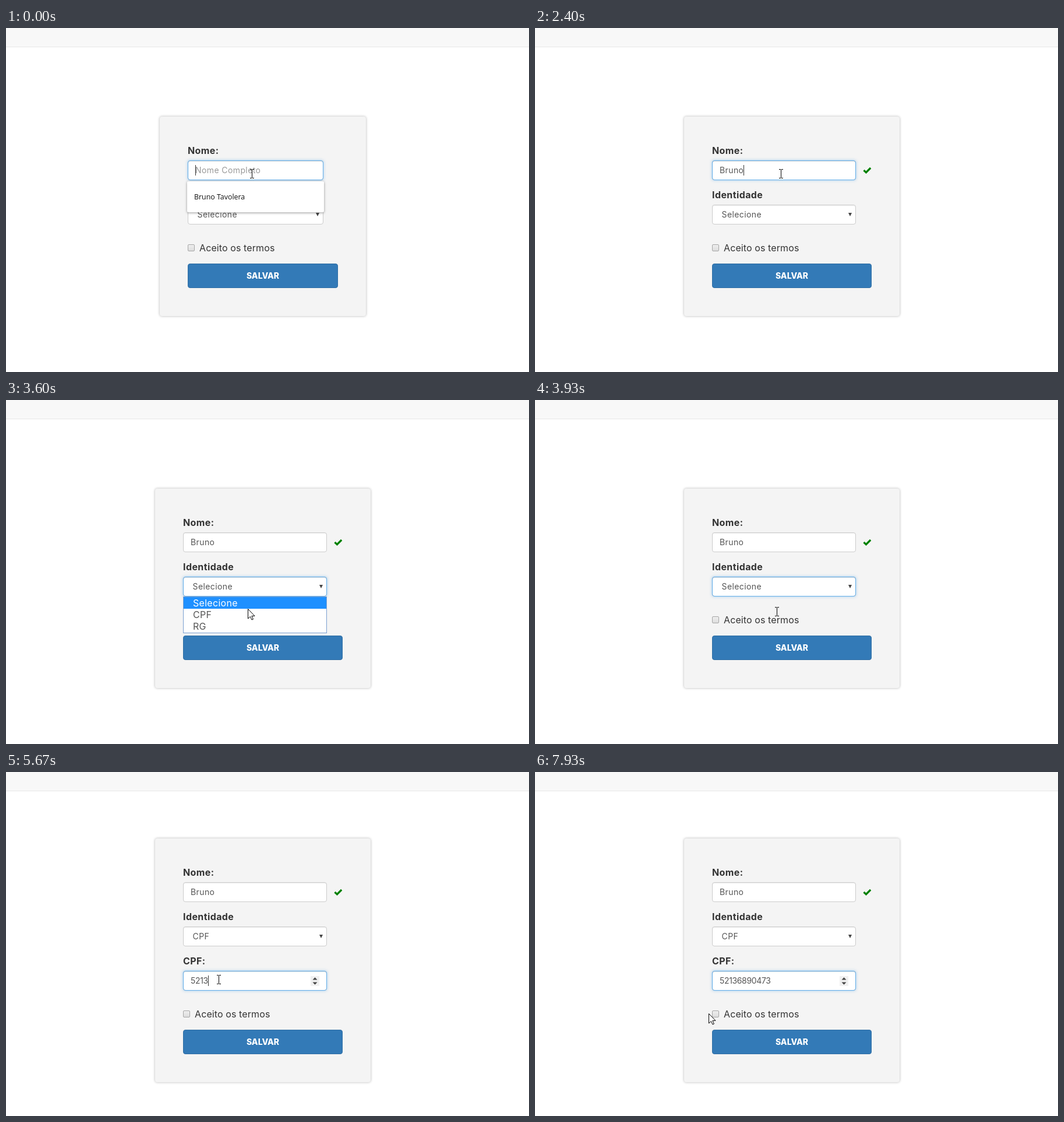
An HTML page for the animation above (8 s loop, 898 px wide and 590 px high).

```html
<!DOCTYPE html>
<html lang="pt">
<head>
<meta charset="utf-8">
<title>Formulário</title>
<style>
  html, body { margin: 0; width: 100%; height: 100%; overflow: hidden; background: #fff; }
  body { position: relative; font: 16px/21px Inter, "Open Sans", sans-serif; color: #333; }
  * { box-sizing: border-box; }
  .bar { height: 33px; background: #f8f8f8; border-bottom: 1px solid #e7e7e7; }
  .card { position: absolute; background: #f4f4f4; border-radius: 4px; box-shadow: 0 0 4px rgba(0,0,0,.3); }
  .card > * { position: absolute; white-space: pre; }
  .label { left: 48px; font-weight: 700; letter-spacing: .4px; }
  .field {
    left: 48px; height: 34px; padding-left: 12px; border: 1px solid #ccc; border-radius: 4px;
    background: #fff; box-shadow: inset 0 1px 1px rgba(0,0,0,.075);
    font-size: 14px; line-height: 32px; letter-spacing: .4px; color: #555;
  }
  .field::after {
    content: ""; position: absolute; inset: -1px; border: 1px solid #66afe9; border-radius: 4px;
    box-shadow: inset 0 1px 1px rgba(0,0,0,.075), 0 0 5px rgba(102,175,233,.6); opacity: var(--focus, 0);
  }
  .select { padding-left: 15.5px; }
  .field svg { position: absolute; }
  .hint { color: #999; }
  .caret { display: inline-block; width: 1px; height: 18px; margin-right: -1px; vertical-align: middle; background: #333; position: relative; top: -1px; }
  #cpf { letter-spacing: -.35px; }
  .popup {
    left: 47px; height: 53px; padding-left: 12px; border-radius: 2px; background: #fff;
    box-shadow: 0 1px 4px rgba(0,0,0,.4); font: 12.4px/53px "Open Sans", "Noto Sans", sans-serif; color: #111;
  }
  .list { left: 48px; top: 185px; height: 63px; border: 1px solid #7a9fd0; background: #fff; color: #555; }
  .list div { height: 20px; padding-left: 16px; line-height: 20px; letter-spacing: .3px; }
  .list .on { background: #1e90ff; color: #fff; }
  .box { left: 48px; width: 12px; height: 12px; border: 1px solid #a6a6a6; border-radius: 2px; background: linear-gradient(#eee, #ddd); }
  .terms { left: 68px; letter-spacing: .1px; }
  .save {
    left: 48px; height: 42px; border: 1px solid #2e6da4; border-radius: 4px; background: #337ab7;
    color: #fff; font-size: 14px; font-weight: 800; line-height: 40px; text-align: center;
  }
  #mouse { position: absolute; left: 0; top: 0; overflow: visible; }
</style>
</head>
<body>
<div class="bar"></div>
<div class="card" id="card">
  <div class="label" style="top:48px">Nome:</div>
  <div class="field" id="name" style="top:75px"></div>
  <svg id="check" width="15" height="12" style="top:86px"><path d="M1.5 6L5.5 9.7L13.2 2" fill="none" stroke="#008000" stroke-width="3.2"/></svg>
  <div class="label" style="top:124px">Identidade</div>
  <div class="field select" id="select" style="top:151px"><span id="choice"></span><svg width="6" height="6" style="right:6px;top:13px"><path d="M0 0H6L3 6Z" fill="#444"/></svg></div>
  <div class="label extra" style="top:200px">CPF:</div>
  <div class="field extra" id="cpf" style="top:227px"><span id="digits"></span><svg width="15" height="17" style="right:12px;top:8px"><rect width="15" height="17" fill="#f0f0f0"/><path d="M3.5 6.5H11.5L7.5 2.2ZM3.5 10.5H11.5L7.5 14.8Z" fill="#444"/></svg></div>
  <div class="box" id="box"></div>
  <div class="terms" id="terms">Aceito os termos</div>
  <div class="save" id="save">SALVAR</div>
  <div class="popup" id="names" style="top:111px">Bruno Tavolera</div>
  <div class="popup" id="numbers" style="top:263px">521.368.904-73</div>
  <div class="list" id="list"><div>Selecione</div><div>CPF</div><div>RG</div></div>
</div>
<svg id="mouse" width="20" height="20">
  <path id="arrow" d="M.5 .5V17L4.4 13.4L7 19L9.4 18L6.9 12.4H12Z" fill="#fff" stroke="#000"/>
  <path id="beam" d="M-3 -8h3v1h1v-1h3v1h-3v14h3v1h-3v-1h-1v1h-3v-1h3v-14h-3z" fill="#000" shape-rendering="crispEdges"/>
</svg>
<script>
const $ = id => document.getElementById(id);
const LOOP = 8000, TICK = 1000 / 15, BLINK = 8;

// All times below are in ticks of 1/15 s.
const NAME = "Bruno", NAME_KEYS = [6, 8, 10, 12, 13];
const CPF = "52136890473", CPF_KEYS = [75, 77, 81, 85, 88, 92, 96, 100, 103, 107, 111];
const WIDEN = 36, OPEN = 52, HOVER = 55, CLOSE = 59, GROW = 60;
const TO_SELECT = 49, TO_CPF = 66;
const PATH = [
  [0, 422, 250], [41, 422, 250], [48, 421, 318], [50, 420, 321], [54, 415, 358],
  [56, 415, 362], [59, 415, 363], [65, 383, 357], [68, 383, 357], [71, 365, 356],
  [114, 365, 356], [119, 298, 414]
];

const clamp = v => Math.max(0, Math.min(1, v));
const ramp = (n, start) => clamp((n - start) / 2);
const show = (el, on) => { el.style.visibility = on ? "visible" : "hidden"; };
const typed = (n, keys) => keys.filter(k => k <= n).length;

function mouseAt(n) {
  let i = 1;
  while (i < PATH.length - 1 && PATH[i][0] < n) i++;
  const [n0, x0, y0] = PATH[i - 1], [n1, x1, y1] = PATH[i];
  const p = clamp((n - n0) / (n1 - n0));
  return [Math.round(x0 + (x1 - x0) * p), Math.round(y0 + (y1 - y0) * p)];
}

function caret(n, start, keys) {
  const last = keys.filter(k => k <= n).pop() ?? start;
  const lit = Math.floor((n - last) / BLINK) % 2 === 0;
  return `<i class="caret" style="opacity:${lit ? 1 : 0}"></i>`;
}

function layout(wide, tall) {
  const width = wide ? 370 : 354, height = tall ? 418 : 342, shift = tall ? 76 : 0;
  const inner = width - 96, field = wide ? 247 : 233;
  Object.assign($("card").style, {
    left: 441 - width / 2 + "px", top: 323 - height / 2 + "px", width: width + "px", height: height + "px"
  });
  for (const id of ["name", "select", "cpf", "list"]) $(id).style.width = field + "px";
  for (const id of ["names", "numbers"]) $(id).style.width = field + 2 + "px";
  $("save").style.width = inner + "px";
  $("save").style.top = 252 + shift + "px";
  $("box").style.top = 219 + shift + "px";
  $("terms").style.top = 215 + shift + "px";
  $("check").style.left = 33 + inner + "px";
  show($("check"), wide);
  document.querySelectorAll(".extra").forEach(el => show(el, tall));
}

function render(n) {
  const tall = n >= GROW;
  layout(n >= WIDEN, tall);

  const count = typed(n, NAME_KEYS);
  const nameCaret = n < TO_SELECT ? caret(n, -6, NAME_KEYS) : "";
  $("name").innerHTML = count ? NAME.slice(0, count) + nameCaret
    : nameCaret + '<span class="hint">Nome Completo</span>';
  $("digits").innerHTML = CPF.slice(0, typed(n, CPF_KEYS)) + (n > TO_CPF ? caret(n, TO_CPF + 1, CPF_KEYS) : "");
  $("choice").textContent = tall ? "CPF" : "Selecione";

  $("name").style.setProperty("--focus", 1 - ramp(n, TO_SELECT));
  $("select").style.setProperty("--focus", ramp(n, TO_SELECT) - ramp(n, TO_CPF));
  $("cpf").style.setProperty("--focus", ramp(n, TO_CPF));

  show($("names"), n < 30);
  show($("numbers"), n >= 68 && n < 85);
  show($("list"), n >= OPEN && n < CLOSE);
  [...$("list").children].forEach((el, i) => { el.className = i === (n >= HOVER ? 1 : 0) ? "on" : ""; });

  const [x, y] = mouseAt(n);
  const pointing = (n >= 44 && n < CLOSE) || n >= 117;
  $("mouse").style.transform = `translate(${x}px, ${y}px)`;
  show($("arrow"), pointing);
  show($("beam"), !pointing);
}

const begin = performance.now();
let shown = -1;
function loop() {
  const t = (performance.now() - begin) % LOOP;
  const n = Math.min(119, Math.floor((t + 5) / TICK));
  if (n !== shown) render(shown = n);
  requestAnimationFrame(loop);
}
loop();
</script>
</body>
</html>
```
